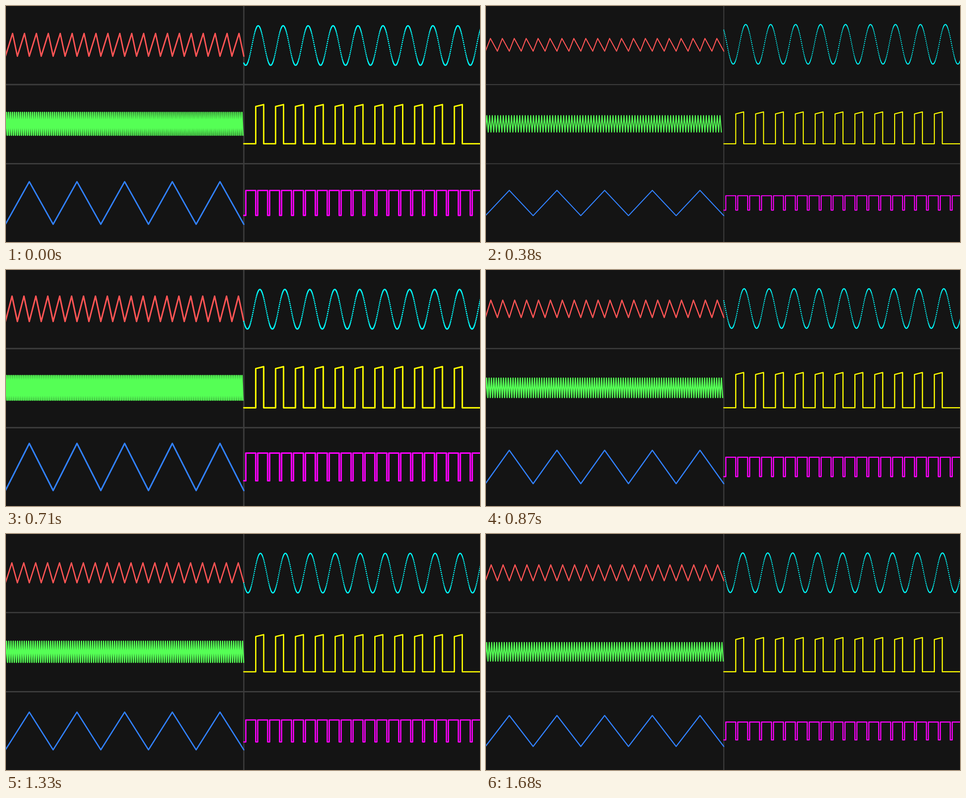
An HTML page with a canvas that plays this animation: 1058x529 px, repeating every 1710 ms.

```html
<!DOCTYPE html>
<html lang="en">
<head>
<meta charset="utf-8">
<title>Six waves</title>
<style>
html, body { margin: 0; width: 100%; height: 100%; overflow: hidden; background: #141414; }
canvas { display: block; width: 1058px; height: 529px; }
</style>
</head>
<body>
<canvas id="stage" width="1058" height="529"></canvas>
<script>
const ctx = document.getElementById('stage').getContext('2d');
const LOOP = 1710;
const SCALE = 0.8867, SHIFT = -1.2;
const W = 1200, H = 600, MID = 600;

// Turning points of the two signals that drive every wave
const BEATS = [
  { t: 0, level: 31.5, bend: 19.7 },
  { t: 210, level: 17.4, bend: 0 },
  { t: 460, level: 18.5, bend: 1 },
  { t: 540, level: 46.8, bend: 27.4 },
  { t: 870, level: 24.4, bend: 4.7 },
  { t: 1050, level: 22, bend: 4 },
  { t: 1110, level: 37.5, bend: 23 },
  { t: 1180, level: 34.9, bend: 21.5 },
  { t: 1520, level: 17.8, bend: 3.6 },
  { t: 1680, level: 22.5, bend: 8.1 }
];

const ease = k => k * k * (3 - 2 * k);
const mix = (a, b, k) => a + (b - a) * k;

function signalAt(t) {
  const next = BEATS.findIndex(b => b.t > t);
  if (next < 0) return BEATS[BEATS.length - 1];
  const a = BEATS[next - 1], b = BEATS[next];
  const k = ease((t - a.t) / (b.t - a.t));
  return { level: mix(a.level, b.level, k), bend: mix(a.bend, b.bend, k) };
}

function line(color, points) {
  ctx.strokeStyle = color;
  ctx.beginPath();
  for (const [x, y] of points) ctx.lineTo(x, y);
  ctx.stroke();
}

function dividers() {
  const color = '#3c3c3c';
  line(color, [[MID, -5], [MID, H + 5]]);
  for (const y of [200, 400]) line(color, [[-5, y], [W + 5, y]]);
}

// Zigzag over the left half, with the top placed at `peak` within each period
function zigzag(color, cy, amp, period, peak = period / 2) {
  const pts = [[0, cy + amp]];
  for (let x = 0; x + period < MID + 0.5; x += period) {
    pts.push([x + peak, cy - amp], [x + period, cy + amp]);
  }
  line(color, pts);
}

function dottedSine(color, shift, size) {
  const top = 1158.5 - shift, cy = 98 + 0.16 * shift;
  ctx.fillStyle = color;
  ctx.beginPath();
  for (let x = MID; x <= W; x++) {
    const y = cy - 50 * Math.cos((x - top) / 10);
    ctx.moveTo(x + size / 2, y);
    ctx.arc(x, y, size / 2, 0, 2 * Math.PI);
  }
  ctx.fill();
}

function slantedPulses(color, base, height) {
  const pts = [[MID, base]];
  for (let x = MID + 30; x + 50 < W; x += 50) {
    pts.push([x, base], [x, base - height + 5], [x + 20, base - height], [x + 20, base]);
  }
  pts.push([W, base]);
  line(color, pts);
}

function square(color, cy, amp) {
  const pts = [];
  for (let x = MID; x < W; x += 30) {
    pts.push([x, cy + amp], [x + 5, cy + amp], [x + 5, cy - amp], [x + 30, cy - amp]);
  }
  line(color, pts);
}

function draw(t) {
  const { level, bend } = signalAt(t);
  const weight = 1.15 + 0.073 * level;

  ctx.setTransform(1, 0, 0, 1, 0, 0);
  ctx.fillStyle = '#141414';
  ctx.fillRect(0, 0, 1058, 529);
  ctx.setTransform(SCALE, 0, 0, SCALE, SHIFT, SHIFT);
  ctx.lineWidth = weight;
  ctx.lineCap = ctx.lineJoin = 'round';

  dividers();
  zigzag('#ff5555', 99.5, 0.95 * level - 1.2, 30, 12.3 + 0.23 * bend + 0.0028 * bend ** 2);
  zigzag('#55ff55', 299.2, 10 + 0.6 * level, 9.495 - 0.142 * level);
  zigzag('#3282ff', 499.3, 2.03 * level ** 0.95, 120);
  dottedSine('#00ffff', bend, 1 + 0.7 * weight);
  slantedPulses('#ffff00', 349.6, 55 + 1.4 * level);
  square('#ff00ff', 499.2, level);
}

function tick() {
  draw(performance.now() % LOOP);
  requestAnimationFrame(tick);
}
tick();
</script>
</body>
</html>
```
